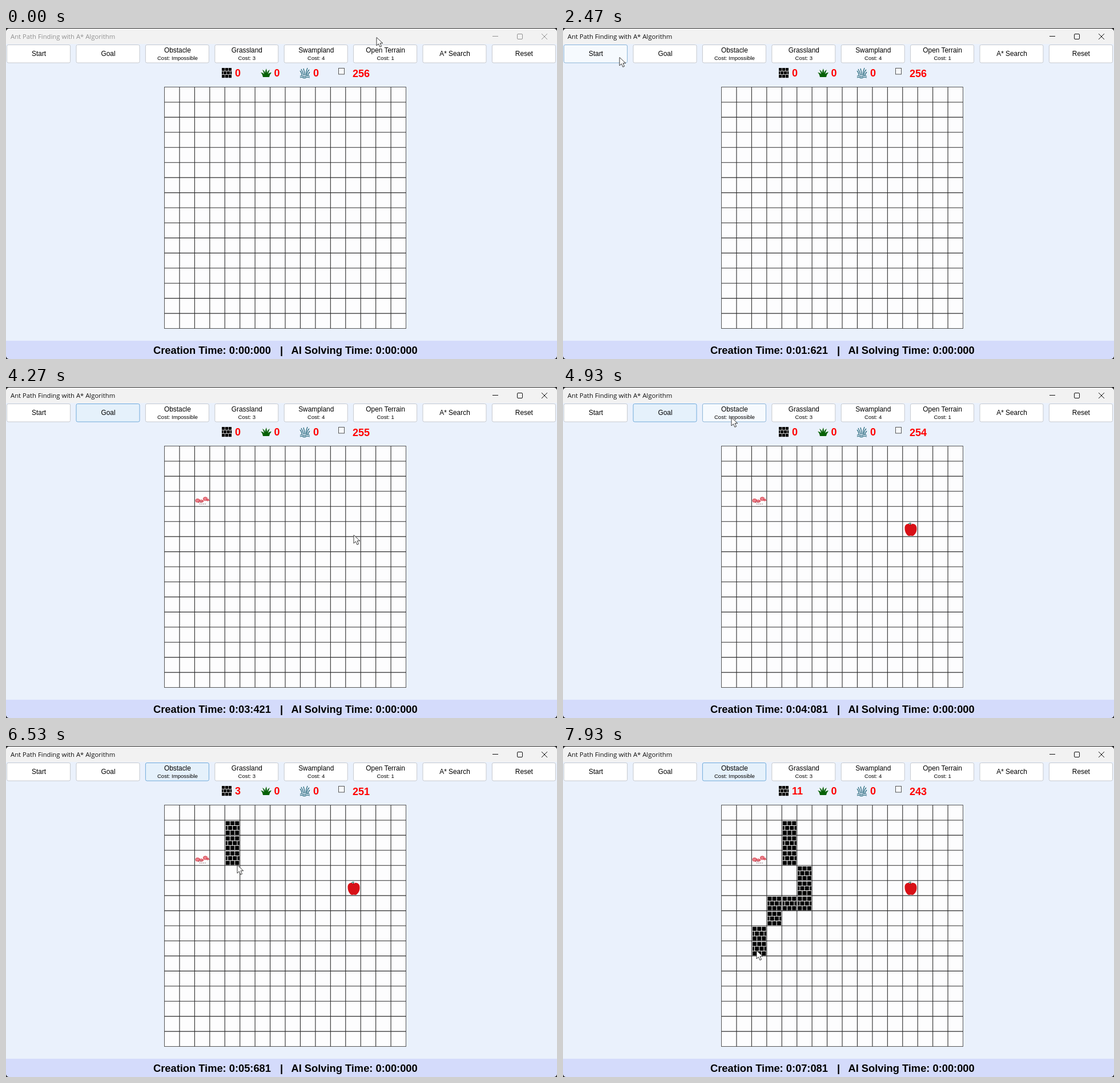
Write an HTML page that moves like this. It is 965x580 px and loops after 8000 ms.

```html
<!DOCTYPE html>
<html lang="en">
<head>
<meta charset="utf-8">
<title>Ant Path Finding</title>
<style>
  html, body { margin: 0; width: 100%; height: 100%; overflow: hidden; background: #2b2b2b; }
  svg { display: block; width: 100vw; height: 100vh; }
  text { font-family: "Liberation Sans", Arial, sans-serif; white-space: pre; }
  .label { font-size: 11.9px; text-anchor: middle; }
  .cost { font-size: 9.6px; text-anchor: middle; }
  .count { font: bold 18px "Liberation Sans", Arial, sans-serif; fill: #f00; }
  .time { font: bold 18.3px "Liberation Sans", Arial, sans-serif; }
  .title { font: 11.3px "Open Sans", "Noto Sans", sans-serif; }
</style>
</head>
<body>
<svg viewBox="0 0 965 580">
  <defs>
    <g id="wall"></g>
  </defs>

  <rect y="1" width="965" height="579" rx="6" fill="#eaf1fc"/>
  <path d="M0 28V7a6 6 0 0 1 6-6H959a6 6 0 0 1 6 6V28Z" fill="#f2f2f2"/>
  <g id="caption">
    <text class="title" x="8" y="19" fill="currentColor">Ant Path Finding with A* Algorithm</text>
    <path d="M852 14.5H862M938 10L948 20M948 10L938 20" stroke="currentColor"/>
    <rect x="895.5" y="10.5" width="9" height="9" rx="1.5" fill="none" stroke="currentColor"/>
  </g>

  <g id="buttons"></g>

  <use href="#wall" transform="translate(378 70) scale(.72)"/>
  <path fill="#076107" d="M450 86Q449 80 446 78Q450 78 452 81Q451 76 449 73Q453 75 454 79Q454 74 456 71Q457 75 457 79Q458 75 462 73Q460 77 459 81Q461 78 465 78Q462 81 461 86Z"/>
  <g fill="none" stroke="#195f73" stroke-width="1.2">
    <path d="M518 83Q518 78 515 75M521 83Q520 77 517 72M523 83Q523 77 521 71M525 83Q525 76 528 70M527 83Q527 77 531 73M529 83Q530 79 532 77"/>
    <path d="M515 84.500q2.500-1.500 5 0t5 0t7 0M515 87q2.500-1.500 5 0t5 0t7 0"/>
  </g>
  <rect x="582.5" y="70.500" width="10" height="10.500" fill="#f7f9fc" stroke="#555"/>
  <g class="count">
    <text id="wallCount" x="401" y="85">0</text>
    <text x="469.500" y="85">0</text>
    <text x="538" y="85">0</text>
    <text id="openCount" x="607" y="86">256</text>
  </g>

  <rect x="277.500" y="103.500" width="423" height="423" fill="#fdfdfe" stroke="#555"/>
  <path id="grid" stroke="#2c2c2c" stroke-width="1.100"/>
  <g id="walls"></g>

  <g id="ant">
    <g fill="#e8808a" stroke="#d22836" stroke-width="1.300" stroke-dasharray="1.500 1">
      <ellipse cx="335.500" cy="199" rx="3.500" ry="3"/>
      <ellipse cx="342" cy="200" rx="3.500" ry="2"/>
      <ellipse cx="349" cy="196" rx="3.500" ry="3"/>
      <ellipse cx="353.500" cy="198" rx="2" ry="1.500"/>
    </g>
    <path d="M337 202.500L344 201M339 205H350" stroke="#5b2830" stroke-dasharray="1.500 1.800"/>
  </g>
  <g id="apple">
    <path d="M608.500 241.500C604 237.500 598 241 598.500 248C598.500 255 603 261 606 261Q609 260 612 261C616 260 620 254 619.500 248C620 241 613 237.500 608.500 241.500Z" fill="#d81117"/>
    <path d="M608.500 242Q608 240 609.500 238" fill="none" stroke="#222"/>
    <path d="M604.500 240Q606 237 609 237.500Q608 240.500 604.500 240Z" fill="#1d8a72"/>
  </g>

  <path d="M0 548H965V574a6 6 0 0 1-6 6H6a6 6 0 0 1-6-6Z" fill="#d4dbfb"/>
  <g class="time">
    <text id="clock" x="258" y="571"></text>
    <text x="480" y="571">|</text>
    <text x="499.500" y="571">AI Solving Time: 0:00:000</text>
  </g>

  <path id="cursor" d="M0 .5V15L3.400 11.700L5.900 17.300L8.500 16.200L6.100 10.700H10.800Z" fill="#fff" stroke="#222" stroke-width=".9"/>
</svg>

<script>
const LOOP = 8000, FPS = 15;
const LEFT = 277.5, TOP = 103.5, CELL = 26.44, SIZE = 16;
const PAINT_START = 5600, ANT_PLACED = 3330, APPLE_PLACED = 4330, ACTIVATED = 470, CLOCK_START = 849;
const $ = id => document.getElementById(id);
const clamp = u => Math.max(0, Math.min(1, u));
const mix = (a, b, u) => `rgb(${a.map((v, i) => Math.round(v + (b[i] - v) * u))})`;

// Turning points of the pointer: time, x, y.
const turns = [
  [0, 649, 16], [470, 888, 44], [870, 442, 200], [1270, 365, 242], [1950, 80, 38], [2470, 99, 51],
  [3330, 345, 198], [3730, 182, 46], [4270, 609, 259], [5060, 270, 37], [5530, 406, 153],
  [6000, 405, 200], [6530, 405, 208], [6600, 412, 212], [7000, 422, 272], [7330, 368, 278],
  [7530, 360, 312], [7600, 352, 320], [7930, 339, 358]
];

function pointerAt(t) {
  const next = turns.findIndex(([time]) => time > t);
  if (next < 0) return turns.at(-1).slice(1);
  const [t0, x0, y0] = turns[next - 1], [t1, x1, y1] = turns[next];
  const u = (t - t0) / (t1 - t0), eased = u * u * (3 - 2 * u);
  return [x0 + (x1 - x0) * eased, y0 + (y1 - y0) * eased];
}

// The screen refreshes on 10 ms marks.
const mark = k => Math.round(k * 100 / FPS) * 10;

const buttons = [
  { name: "Start", from: 2400, to: 3730 },
  { name: "Goal", from: 3730, to: 5000 },
  { name: "Obstacle", cost: "Impossible", from: 5000, to: LOOP },
  { name: "Grassland", cost: "3" },
  { name: "Swampland", cost: "4" },
  { name: "Open Terrain", cost: "1" },
  { name: "A* Search" },
  { name: "Reset", from: 470, to: 2400 }
];
const buttonX = i => 1.6 + i * 121.4;

$("buttons").innerHTML = buttons.map(({ name, cost }, i) => {
  const x = buttonX(i), mid = x + 56;
  return `<rect x="${x}" y="29.5" width="111" height="31.5" rx="2.5"/>` +
    `<text class="label" x="${mid}" y="${cost ? 43 : 49}">${name}</text>` +
    (cost ? `<text class="cost" x="${mid}" y="56">Cost: ${cost}</text>` : "");
}).join("");
const buttonRects = $("buttons").querySelectorAll("rect");

let gridPath = "";
for (let i = 1; i < SIZE; i++) {
  gridPath += `M${LEFT + i * CELL} ${TOP}v${SIZE * CELL}M${LEFT} ${TOP + i * CELL}h${SIZE * CELL}`;
}
$("grid").setAttribute("d", gridPath);

// Three courses of brick, the middle one shifted by half a brick.
let bricks = "";
for (let row = 0; row < 3; row++) {
  for (let x = row === 1 ? -4 : 0; x < 24; x += 8.2) {
    const start = Math.max(0, x), end = Math.min(24, x + 7.2);
    bricks += `M${start} ${row * 8.3}H${end}v7.3H${start}Z`;
  }
}
$("wall").innerHTML = `<path fill="#fff" d="M0 0H24V24H0Z"/><path d="${bricks}"/>`;

// Every cell the pointer is dragged over becomes a wall.
const walls = new Map();
for (let k = 0; mark(k) < LOOP; k++) {
  if (mark(k) < PAINT_START) continue;
  const [x, y] = pointerAt(mark(k));
  const cell = [Math.floor((x - LEFT) / CELL), Math.floor((y - TOP) / CELL)];
  if (!walls.has(`${cell}`)) walls.set(`${cell}`, { cell, time: mark(k) });
}
const wallList = [...walls.values()];
$("walls").innerHTML = wallList.map(({ cell: [col, row] }) =>
  `<use href="#wall" x="${LEFT + col * CELL + 1.5}" y="${TOP + row * CELL + 1.8}"/>`).join("");
const wallShapes = [...$("walls").children];

const show = (el, on) => el.setAttribute("visibility", on ? "visible" : "hidden");

function formatTime(ms) {
  const seconds = Math.floor(ms / 1000);
  return `0:${String(seconds).padStart(2, "0")}:${String(ms % 1000).padStart(3, "0")}`;
}

function drawButtons(t, x, y) {
  buttons.forEach(({ from, to }, i) => {
    const chosen = t >= from && t < to ? clamp((t - from) / 200) : 0;
    const hovered = y > 29 && y < 62 && x > buttonX(i) && x < buttonX(i) + 111;
    const glow = Math.max(chosen, hovered ? .35 : 0);
    buttonRects[i].setAttribute("fill", mix([255, 255, 255], [229, 241, 251], glow));
    buttonRects[i].setAttribute("stroke", mix([198, 201, 206], [112, 170, 218], clamp(glow * 2)));
  });
}

function draw(t) {
  const [x, y] = pointerAt(t);
  $("cursor").setAttribute("transform", `translate(${Math.round(x)} ${Math.round(y)})`);
  $("caption").style.color = t >= ACTIVATED ? "#111" : "#929292";
  drawButtons(t, x, y);

  show($("ant"), t >= ANT_PLACED);
  show($("apple"), t >= APPLE_PLACED);
  wallList.forEach(({ time }, i) => show(wallShapes[i], t >= time));
  const placed = wallList.filter(({ time }) => t >= time).length;
  $("wallCount").textContent = placed;
  $("openCount").textContent = SIZE * SIZE - placed - (t >= ANT_PLACED) - (t >= APPLE_PLACED);
  $("clock").textContent = "Creation Time: " + formatTime(Math.max(0, t - CLOCK_START));
}

function frame() {
  const t = performance.now() % LOOP;
  let k = Math.floor(t * FPS / 1000) + 1;
  while (mark(k) > t) k--;
  draw(mark(k));
  requestAnimationFrame(frame);
}
frame();
</script>
</body>
</html>
```
